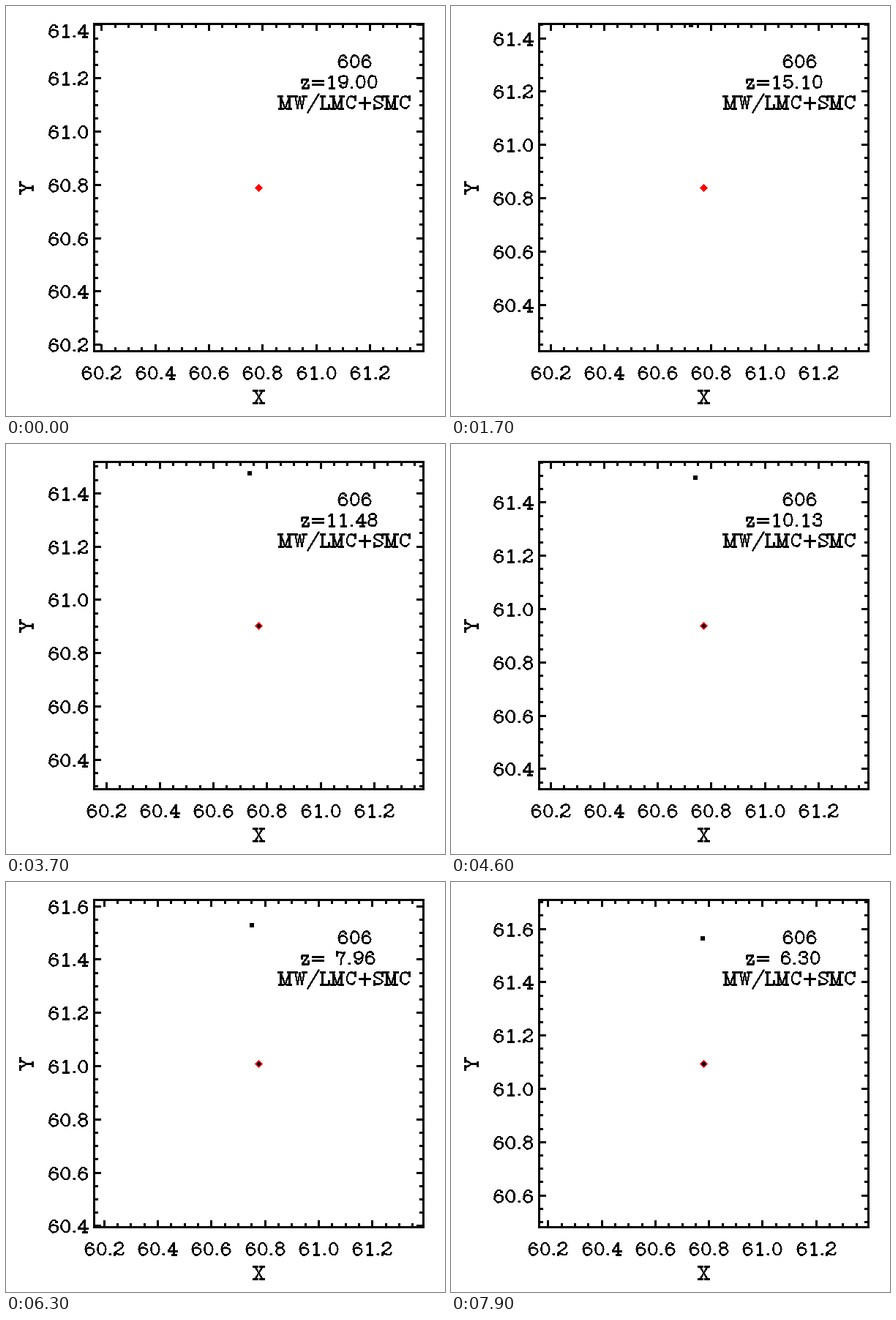
A matplotlib script that plays this animation: 600 px wide and 560 px high, repeating every 8000 ms.

```python
import numpy as np
import matplotlib.pyplot as plt
from matplotlib.animation import FuncAnimation
from matplotlib.collections import LineCollection
from matplotlib.patches import Circle, Rectangle, RegularPolygon

W, H, DPI = 600, 560, 100
FRAMES, INTERVAL = 80, 100
PX = 72 / DPI
S = 0.8                         # pixels per glyph unit
LEFT, RIGHT, TOP, BOTTOM = 120, 570, 24, 471
MID_X, MID_Y = (LEFT + RIGHT) / 2, (TOP + BOTTOM) / 2
SCALE_X, SCALE_Y = 366.5, 364   # pixels per data unit

# Key points of the motion: redshift, view centre, companion pixel
KEYS = [0, 17, 28, 37, 55, 70, 79]
REDSHIFT = [19.00, 15.10, 13.01, 11.48, 8.92, 7.20, 6.30]
CENTRE_X = [60.784, 60.770, 60.7675, 60.7675, 60.773, 60.777, 60.779]
CENTRE_Y = [60.791, 60.841, 60.874, 60.905, 60.974, 61.043, 61.096]
DOT_X = [327, 328, 329, 333, 334, 338, 344]
DOT_Y = [16, 26.5, 33, 40, 53, 65, 77]


# Single-stroke serif letters: y runs up from the baseline, capitals are CAP high
CAP = 21


def line(*c):
    return list(zip(c[::2], c[1::2]))


def arc(cy, rx, ry, a=0, b=360, cx=10):
    t = np.radians(np.linspace(a, b, 2 + abs(b - a) // 30))
    return list(zip(cx + rx * np.cos(t), cy + ry * np.sin(t)))


def dot(x, y):
    return line(x - 1, y, x, y + 1, x + 1, y, x, y - 1, x - 1, y)


def feet(y, *xs, r=3):
    return [line(x - r, y, x + r, y) for x in xs]


def turn(strokes):
    return [[(20 - x, CAP - y) for x, y in s] for s in strokes]


SIX = [arc(6.5, 7, 6.5), arc(10, 7, 11, 45, 180), dot(15, 17)]

GLYPHS = {
    ' ': (16, []),
    '.': (10, [dot(5, 1)]),
    '/': (22, [line(20, 25, 2, -7)]),
    '+': (26, [line(13, 18, 13, 0)] + feet(9, 13, r=9)),
    '=': (26, feet(12, 13, r=9) + feet(6, 13, r=9)),
    '0': (20, [arc(10.5, 7, 10.5)]),
    '1': (20, [line(6, 17, 11, CAP, 11, 0)] + feet(0, 11, r=4)),
    '2': (20, [dot(4, 16), arc(16, 7, 5, 180, -40) + line(3, 4, 3, 0),
               line(3, 2, 6, 3, 12, 0, 16, 1, 17, 4)]),
    '3': (20, [dot(4, 16), dot(4, 5), arc(16.5, 6, 4.5, 170, -90),
               arc(6, 7, 6, 90, -170)]),
    '4': (20, [line(13, 0, 13, CAP, 2, 6, 18, 6)] + feet(0, 13)),
    '5': (20, [line(15, CAP, 5, CAP, 3, 11) + arc(7, 7, 7, 130, -160),
               dot(4, 5)]),
    '6': (20, SIX),
    '7': (20, [line(3, 15, 3, CAP),
               line(3, 18, 7, CAP, 13, 18, 17, CAP, 11, 9, 10, 0)]),
    '8': (20, [arc(16.5, 6, 4.5), arc(6, 7, 6)]),
    '9': (20, turn(SIX)),
    'C': (21, [arc(10.5, 8, 10.5, 45, 320, cx=11), line(18, 15, 18, CAP)]),
    'L': (18, [line(5, CAP, 5, 0)] + feet(CAP, 5)
          + [line(2, 0, 16, 0, 16, 6)]),
    'M': (25, [line(5, 0, 5, CAP, 12, 0, 19, CAP, 19, 0)]
          + feet(CAP, 4, 20) + feet(0, 5, 19)),
    'S': (20, [line(17, 15, 17, CAP), line(3, 0, 3, 6),
               arc(16, 7, 5, 30, 220) + arc(5, 7, 5, 40, -150)]),
    'W': (24, [line(4, CAP, 8, 0, 12, CAP, 16, 0, 20, CAP)]
          + feet(CAP, 4, 20)),
    'X': (20, [line(4, CAP, 16, 0), line(16, CAP, 4, 0)]
          + feet(CAP, 4, 16) + feet(0, 4, 16)),
    'Y': (21, [line(4, CAP, 10, 10, 10, 0), line(17, CAP, 10, 10)]
          + feet(CAP, 4, 17) + feet(0, 10)),
    'z': (18, [line(4, 10, 4, 14, 15, 14, 3, 0, 15, 0, 15, 4)]),
}


def write(text, x, y, align=0.0, upright=True):
    """Pixel-snapped strokes of a text; align 0 left, 0.5 centre, 1 right."""
    pen, out = -align * S * sum(GLYPHS[c][0] for c in text), []
    for c in text:
        advance, strokes = GLYPHS[c]
        for s in strokes:
            along, up = S * np.array(s, float).T
            along = along + pen
            q = (x + along, y - up) if upright else (x - up, y - along)
            out.append(np.floor(np.column_stack(q) + 0.5))
        pen += advance * S
    return out


fig = plt.figure(figsize=(W / DPI, H / DPI), dpi=DPI, facecolor='white')
ax = fig.add_axes([0, 0, 1, 1])
ax.set_xlim(-0.5, W - 0.5)
ax.set_ylim(H - 0.5, -0.5)
ax.axis('off')


def pen_lines(lw, cap):
    lc = LineCollection([], colors='black', linewidths=lw * PX,
                        antialiaseds=False, capstyle=cap, joinstyle='bevel')
    lc.set_snap(False)
    return ax.add_collection(lc, autolim=False)


def shape(patch):
    patch.set_antialiased(False)
    patch.set_snap(False)
    return ax.add_patch(patch)


ticks = pen_lines(3, 'round')
labels = pen_lines(1.03, 'projecting')
companion = shape(Circle((0, 0), 2.9, fc='black', lw=0))
shape(Rectangle((LEFT, TOP), RIGHT - LEFT, BOTTOM - TOP, fill=False,
                ec='black', lw=3 * PX, joinstyle='round', zorder=3))
shape(RegularPolygon((MID_X, 248), 4, radius=5, orientation=np.pi / 4 * 0,
                     fc='red', lw=0, zorder=4))
core = shape(Circle((MID_X, 248), 1, fc='black', lw=0, zorder=5))

FIXED = (write('606', 452, 83.5) + write('MW/LMC+SMC', 371.4, 139.5)
         + write('X', MID_X, 541.5, 0.5)
         + write('Y', 36, 248, 0.5, upright=False))


def steps(centre, half):
    """Tick numbers, in twentieths of a unit, inside the view."""
    lo, hi = (centre - half) * 20, (centre + half) * 20
    return range(int(np.ceil(lo)), int(np.floor(hi)) + 1)


def update(n):
    def at(values):
        return np.interp(n, KEYS, values)

    cx, cy = at(CENTRE_X), at(CENTRE_Y)
    marks, text = [], list(FIXED)

    for k in steps(cx, (MID_X - LEFT) / SCALE_X):
        x = int(MID_X + (k / 20 - cx) * SCALE_X)
        size = 4 if k % 4 else 8
        marks += [[(x, TOP), (x, TOP + size)],
                  [(x, BOTTOM), (x, BOTTOM - size)]]
        if k % 4 == 0:
            text += write(f'{k / 20:.1f}', x, 509, 0.5)

    for k in steps(cy, (MID_Y - TOP) / SCALE_Y):
        y = int(MID_Y - (k / 20 - cy) * SCALE_Y)
        size = 4 if k % 4 else 8
        marks += [[(LEFT, y), (LEFT + size, y)],
                  [(RIGHT, y), (RIGHT - size, y)]]
        if k % 4 == 0:
            # the topmost label stays below the frame's upper edge
            base = max(y + 9, TOP + 18)
            text += write(f'{k / 20:.1f}', 112.8, base, 1)

    z = np.exp(at(np.log1p(REDSHIFT))) - 1
    text += write(f'z={z:5.2f}', 401.2, 111.5)
    ticks.set_segments(marks)
    labels.set_segments(text)

    companion.center = round(at(DOT_X)) - 0.5, round(at(DOT_Y)) - 0.5
    companion.set_visible(at(DOT_Y) >= TOP)
    core.set_radius(1.1 + 0.016 * n)
    core.set_visible(n >= 22)
    return ticks, labels, companion, core


anim = FuncAnimation(fig, update, frames=FRAMES, interval=INTERVAL,
                     init_func=lambda: update(0), repeat=True,
                     repeat_delay=0, blit=False)
plt.show()
```
